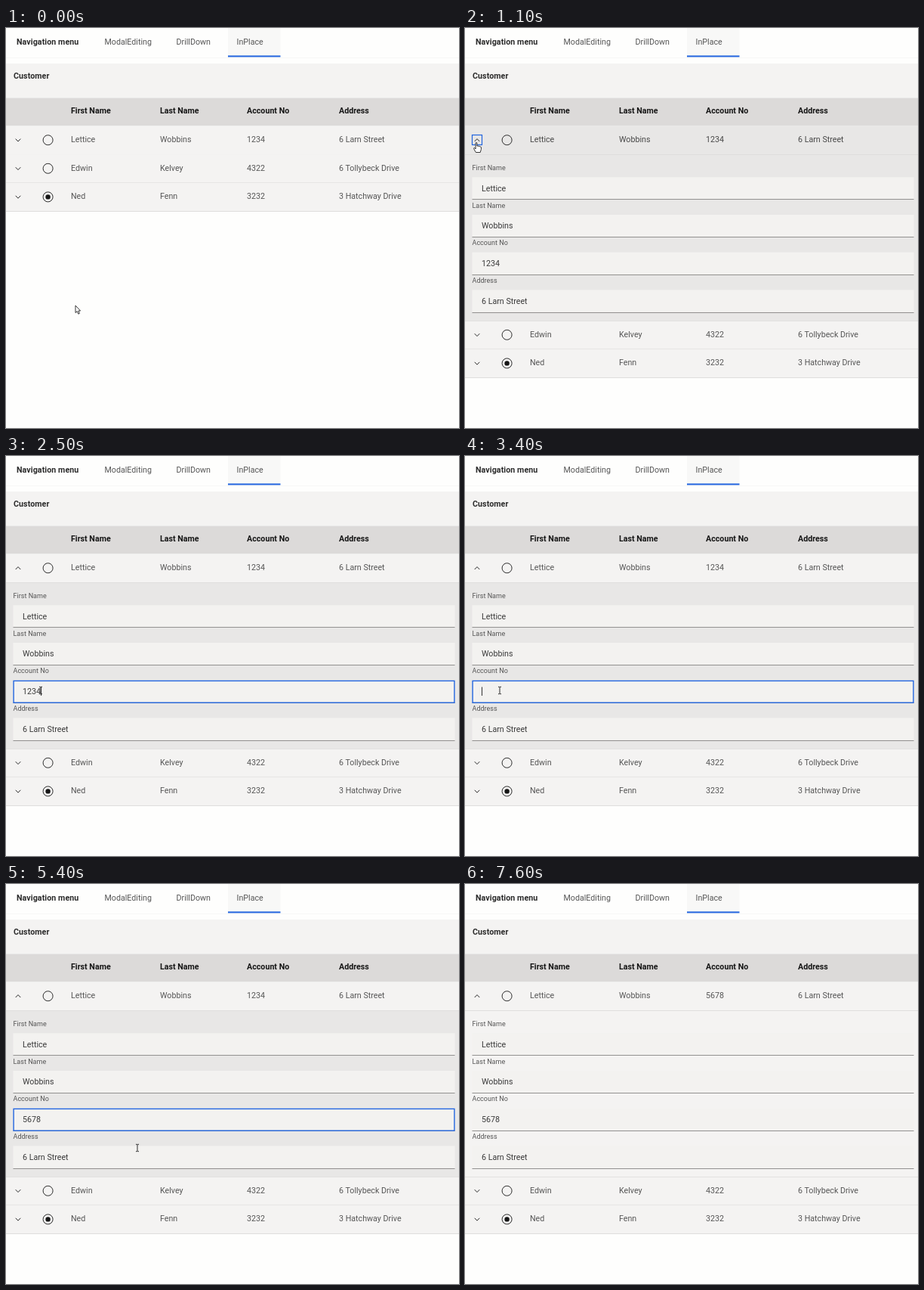
These frames come from a looping animation (600x529 px, 7.7 s). An HTML page:

```html
<!DOCTYPE html>
<html lang="en">
<head>
<meta charset="utf-8">
<title>In-place table editing</title>
<style>
  html, body { margin: 0; width: 100%; height: 100%; overflow: hidden; background: #fefefd; }
  svg { display: block; width: 600px; height: 529px; }
  text { font: 400 10.7px Roboto, "Open Sans", sans-serif; fill: #565656; white-space: pre; }
  .bold { font-weight: 600; fill: #161616; }
  .title { font-weight: 600; fill: #2c2c2c; letter-spacing: .06px; }
  .label { font-size: 9px; letter-spacing: .02px; }
  .value { fill: #3a3a3a; }
  .hover text { fill: #484848; }
  .line { fill: none; stroke: #2a2a2a; stroke-width: 1; }
</style>
</head>
<body>
<svg id="stage" viewBox="0 0 600 529"></svg>
<script>
const LOOP = 7700, STEP = 100;
const OPEN_AT = 1000, PRESS_AT = 900, FOCUS_AT = 2000, BLUR_AT = 6000;
const SHIFT = 220, ROW = 37.6, FIELD = 49.7;
const PANEL = '#f4f3f2', HOVER = '#e8e7e6', BLUE = '#2264de';
const COLS = [86, 204, 319, 441];
const HEADS = ['First Name', 'Last Name', 'Account No', 'Address'];
const PEOPLE = [
  ['Lettice', 'Wobbins', '1234', '6 Larn Street'],
  ['Edwin', 'Kelvey', '4322', '6 Tollybeck Drive'],
  ['Ned', 'Fenn', '3232', '3 Hatchway Drive']
];

// time, x, y of the pointer
const PATH = [
  [0, 92, 367], [200, 92, 367], [800, 15, 151], [1100, 15, 151],
  [1700, 46, 310], [4800, 46, 310], [5300, 174, 349], [5700, 174, 349],
  [6000, 191, 335], [6600, 191, 335], [7300, 212, -16], [LOOP, 212, -16]
];
// time, content of the account field
const EDITS = [
  [0, '1234'], [FOCUS_AT, '1234'], [2600, '123'], [2800, '12'], [2900, '1'], [3100, ''],
  [3800, '5'], [4100, '56'], [4400, '567'], [4700, '5678']
];

const stage = document.getElementById('stage');

function add(parent, tag, attrs = {}, content) {
  const el = document.createElementNS('http://www.w3.org/2000/svg', tag);
  for (const k in attrs) el.setAttribute(k, attrs[k]);
  if (content !== undefined) el.textContent = content;
  parent.appendChild(el);
  return el;
}
const box = (p, x, y, width, height, fill) => add(p, 'rect', { x, y, width, height, fill });
const write = (p, x, y, str, cls = '') => add(p, 'text', { x, y, class: cls }, str);
const outline = (p, x, y, width, height, w) =>
  add(p, 'rect', { x, y, width, height, fill: 'none', stroke: BLUE, 'stroke-width': w });
const show = (el, on) => el.setAttribute('visibility', on ? 'visible' : 'hidden');

// navigation
box(stage, 0, 0, 600, 529, '#fefefd');
box(stage, 0, 39, 600, 1, '#f7f7f6');
box(stage, 294, 0, 69.5, 37, '#f8f8f7');
box(stage, 294, 36.4, 69.5, 2, BLUE);
write(stage, 14, 22.3, 'Navigation menu', 'title');
write(stage, 130.5, 22.3, 'ModalEditing');
write(stage, 225.5, 22.3, 'DrillDown');
write(stage, 305.5, 22.3, 'InPlace');

// table head
box(stage, 0, 47, 600, 45.5, PANEL);
write(stage, 10, 67, 'Customer', 'title');
box(stage, 0, 92.5, 600, 37, '#dcdad9');
HEADS.forEach((h, i) => write(stage, COLS[i], 113.2, h, 'bold'));

// detail panel
const detail = add(stage, 'g');
const detailBack = box(detail, 0, 167, 600, 220.5, HOVER);
const fields = HEADS.map((h, i) => {
  const y = FIELD * i;
  write(detail, 9.5, 188 + y, h, 'label');
  box(detail, 9.5, 197.3 + y, 585, 29.2, '#f3f2f0');
  box(detail, 9.5, Math.round(226.4 + y), 585, 1, '#929190');
  return write(detail, 22, 215.6 + y, PEOPLE[0][i], 'value');
});
const account = fields[2];
const fieldFocus = outline(detail, 10.1, 297.4, 583.8, 28.8, 1.4);
const caret = box(detail, 22, 305.5, 1, 11.5, '#333');

// rows
const rows = PEOPLE.map((person, i) => {
  const g = add(stage, 'g'), y = ROW * i;
  const back = box(g, 0, 129.5 + y, 600, ROW, PANEL);
  box(g, 0, Math.round(166.6 + y), 600, 1, '#dfdedd');
  const chevron = add(g, 'path', { class: 'line' });
  add(g, 'circle', { class: 'line', cx: 55.6, cy: 148.2 + y, r: 6.5 });
  if (i === 2) add(g, 'circle', { cx: 55.6, cy: 148.2 + y, r: 3.2, fill: '#161616' });
  const cells = person.map((s, c) => write(g, COLS[c], 150.9 + y, s));
  return { g, back, chevron, cells, y };
});
const chevronFocus = outline(stage, 9.5, 141.5, 13, 13, 1.2);
const tableEnd = box(stage, 0, 387, 600, 1, '#e2e1e0');

// pointers, drawn around their hot spots
const pointer = add(stage, 'g');
const shape = d => add(pointer, 'path', {
  d, fill: '#fff', stroke: '#222', 'stroke-width': .9, 'stroke-linejoin': 'round'
});
const pointers = {
  arrow: shape('M0 0V9.6L2.2 7.6L3.8 11.2L5.4 10.5L3.9 7H6.6Z'),
  hand: shape('M-.9 1Q0-.3 .9 1V5L2.9 5.2L4.8 5.7L6.4 6.6V9.5L5.2 13.5H-.6L-3.4 8.6Q-3.4 7.2-2.2 7.6L-.9 9Z'),
  beam: add(pointer, 'path', { class: 'line', d: 'M-2-4.7H-.5L0-4.2L.5-4.7H2M0-4.2V4.2M-2 4.7H-.5L0 4.2L.5 4.7H2' })
};

function pointerAt(t) {
  const i = PATH.findIndex(k => k[0] > t);
  const [t0, x0, y0] = PATH[i - 1], [t1, x1, y1] = PATH[i];
  const u = (t - t0) / (t1 - t0), e = u * u * (3 - 2 * u);
  return [x0 + (x1 - x0) * e, y0 + (y1 - y0) * e];
}

function draw(t) {
  const open = t >= OPEN_AT;
  const focused = t >= FOCUS_AT && t < BLUR_AT;
  const [x, y] = pointerAt(t);
  const [editTime, content] = EDITS.filter(e => e[0] <= t).pop();
  const inside = (top, height) => y >= top && y < top + height;

  rows.forEach((r, i) => {
    const dy = open && i ? SHIFT : 0;
    const over = inside(129.5 + r.y + dy, ROW);
    const cy = 148.3 + r.y, bend = open && !i ? -1.7 : 1.7;
    r.g.setAttribute('transform', `translate(0 ${dy})`);
    r.g.setAttribute('class', over ? 'hover' : '');
    r.back.setAttribute('fill', over ? HOVER : PANEL);
    r.chevron.setAttribute('d', `M12.7 ${cy - bend}L16 ${cy + bend}L19.3 ${cy - bend}`);
  });
  rows[0].cells[2].textContent = t >= BLUR_AT ? '5678' : '1234';

  show(detail, open);
  show(tableEnd, open);
  detailBack.setAttribute('fill', inside(129.5, 258) ? HOVER : PANEL);
  show(chevronFocus, t >= PRESS_AT && t < FOCUS_AT);
  account.textContent = content;
  show(fieldFocus, focused);
  show(caret, focused && (t - editTime) % 1060 < 530);
  caret.setAttribute('x', 22 + (content ? account.getComputedTextLength() : 0));

  const inField = open && HEADS.some((h, i) => inside(197.3 + FIELD * i, 29.5));
  const kind = inField ? 'beam' : x < 23 && inside(141, 14) ? 'hand' : 'arrow';
  for (const k in pointers) show(pointers[k], k === kind);
  pointer.setAttribute('transform', `translate(${x.toFixed(2)} ${y.toFixed(2)})`);
}

// show() on a group must not be undone by its children
[fieldFocus, caret].forEach(el => show(el, false));

const start = performance.now();
function tick() {
  const t = (performance.now() - start) % LOOP;
  draw(Math.floor(t / STEP) * STEP);
  requestAnimationFrame(tick);
}
tick();
</script>
</body>
</html>
```
